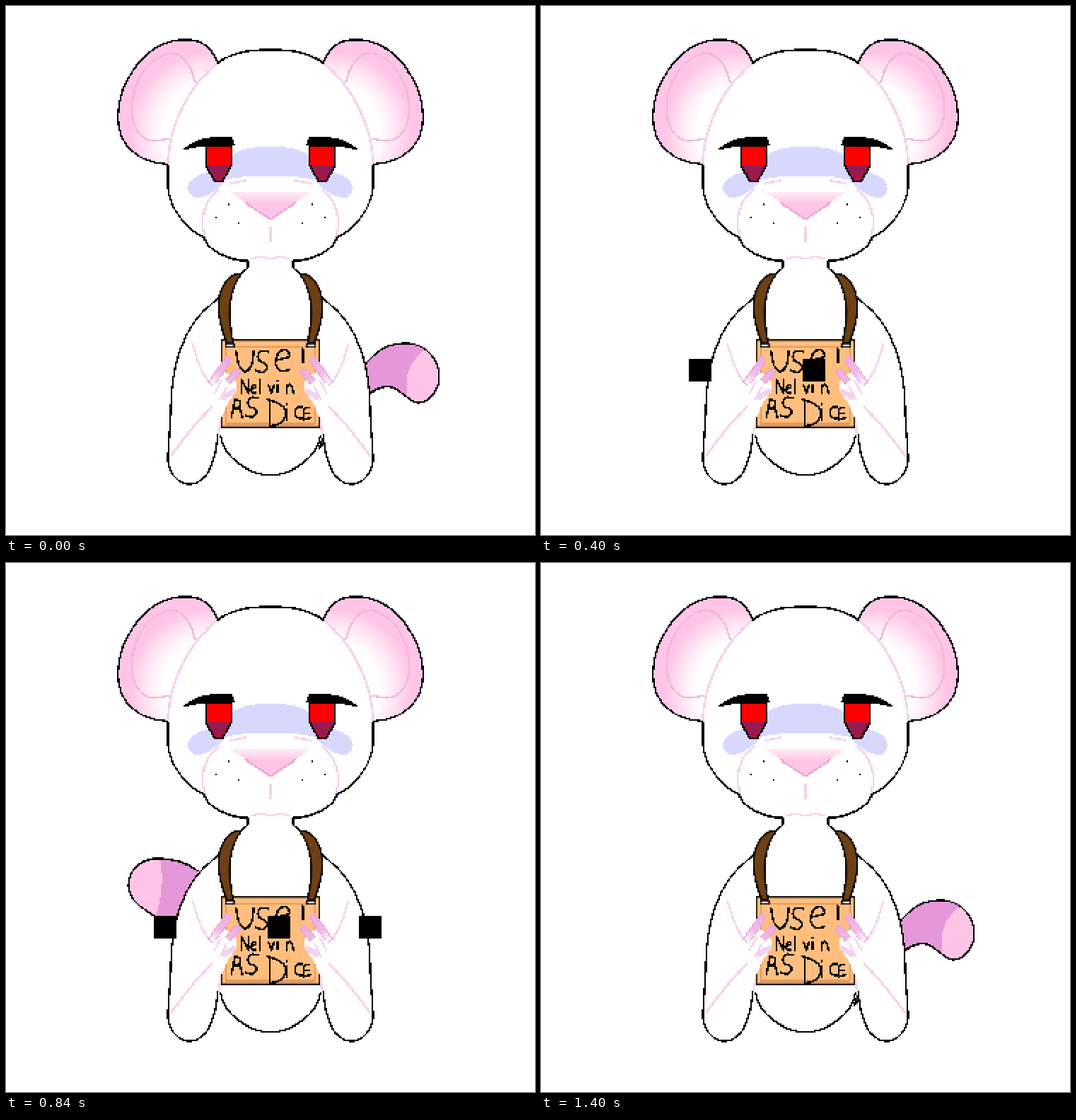
Write an HTML page with a canvas that moves like this. It is 748 px wide and 748 px high and loops after 1600 ms.

```html
<!DOCTYPE html>
<html lang="en">
<head>
<meta charset="utf-8">
<title>Mouse with a sign</title>
<style>
html, body { margin: 0; width: 100%; height: 100%; overflow: hidden; background: #fff; }
canvas { display: block; width: 748px; height: 748px; image-rendering: pixelated; }
</style>
</head>
<body>
<canvas id="view"></canvas>
<script>
const SIZE = 748, GRID = 372, K = GRID / SIZE;
const PINK = '#ffc5e6', PALE = '#f4d2ec', MAUVE = '#e697d9', BLACK = '#000', WHITE = '#fff';

function layer() {
  const c = document.createElement('canvas');
  c.width = c.height = GRID;
  return c.getContext('2d', { willReadFrequently: true });
}
const pen = layer();

// Paint a path with hard pixel edges; flip mirrors it about the middle
function paint(out, path, { fill, line, w = 2.3, flip, clip }) {
  const shape = new Path2D(path);
  pen.setTransform(1, 0, 0, 1, 0, 0);
  pen.clearRect(0, 0, GRID, GRID);
  pen.save();
  pen.setTransform(flip ? -K : K, 0, 0, K, flip ? GRID : 0, 0);
  pen.lineCap = pen.lineJoin = 'round';
  if (clip) pen.clip(new Path2D(clip));
  if (fill) { pen.fillStyle = fill; pen.fill(shape); }
  if (line) { pen.strokeStyle = line; pen.lineWidth = w; pen.stroke(shape); }
  pen.restore();
  const img = pen.getImageData(0, 0, GRID, GRID), d = img.data;
  for (let i = 3; i < d.length; i += 4) d[i] = d[i] > 110 ? 255 : 0;
  pen.putImageData(img, 0, 0);
  out.drawImage(pen.canvas, 0, 0);
}

function both(out, path, style) {
  paint(out, path, style);
  paint(out, path, { ...style, flip: true });
}

// Colours spread evenly along a gradient
function blend(gradient, ...colors) {
  colors.forEach((c, i) => gradient.addColorStop(i / (colors.length - 1), c));
  return gradient;
}

// Left halves of the symmetric outlines
const ARM = 'C245 455 233 515 233 580 L229 640 C229 660 245 676 260 676 C285 676 297 640 299 606';
const BELLY = 'C307 640 345 663 374 663';
const BROW = 'C350 62 320 64 299 81', TEMPLE = 'C260 110 230 170 229 224';
const CHEEK = 'V255 C230 285 258 318 280 326', CHIN = 'C282 345 315 360 342 360';
const EAR = 'M299 80 C285 50 270 47 250 48 C200 50 158 105 158 157 C158 200 190 222 229 224';

function drawBody(g) {
  both(g, `M374 360 H342 V370 L299 414 ${ARM} L303 608 ${BELLY} Z`, { fill: WHITE });
  both(g, `M299 414 ${ARM} M303 608 ${BELLY}`, { line: BLACK });
  both(g, 'M264 478 Q271 505 285 532', { line: PALE });
  both(g, 'M234 636 Q265 592 300 558 M304 582 L300 606', { line: PALE, w: 3 });
}

function drawHead(g) {
  const glow = blend(pen.createRadialGradient(285, 175, 64, 285, 175, 110), WHITE, '#fff0f8', '#ffdcf0', PINK);
  both(g, EAR, { fill: glow });
  both(g, 'M268 108 C258 70 240 62 222 70 C165 95 165 190 210 191 L230 188', { line: '#f0b8d8' });
  both(g, EAR, { line: BLACK });
  both(g, `M374 62 ${BROW} ${TEMPLE} ${CHEEK} ${CHIN} H374 Z`, { fill: WHITE });
  both(g, `M299 81 ${TEMPLE}`, { line: PALE, w: 3 });
  both(g, `M374 62 ${BROW} M229 224 ${CHEEK} ${CHIN} V370 L333 378`, { line: BLACK });
  both(g, 'M346 357 L360 355 L374 357', { line: PALE });
}

function drawFace(g) {
  both(g, 'M374 199 C345 199 330 203 318 212 L300 232 C265 238 255 250 259 263 ' +
    'C265 280 290 270 312 246 Q330 241 374 241 Z', { fill: '#d8d8ff' });
  both(g, 'M281 325 C275 300 278 278 300 260 M316 251 L340 247', { line: PALE });

  const eye = 'M283 197 V228 L295 248 H306 L318 226 V197 Z';
  both(g, eye, { fill: '#f00' });
  both(g, 'M280 226 H320 V250 H280 Z', { fill: blend(pen.createLinearGradient(0, 226, 0, 248), '#8e1f57', '#a81440'), clip: eye });
  both(g, eye, { line: BLACK });
  both(g, 'M249 204 Q268 188 288 186 H320 L323 197 H285 Z', { fill: BLACK });

  paint(g, 'M316 263 H432 L374 301 Z', { fill: blend(pen.createLinearGradient(0, 262, 0, 280), '#fff0f8', PINK) });
  both(g, 'M338 278 L374 301', { line: '#eaa9ce' });
  paint(g, 'M374 313 V334', { line: PALE });
  both(g, 'M314 279h2v2h-2z M296 298h2v2h-2z M328 305h2v2h-2z', { fill: BLACK });
}

// Handwriting strokes in a box ten units tall
const GLYPHS = {
  U: 'M0 0 Q1 9 4 9.6 Q8 9 8 0',
  S: 'M6 .5 Q1 -1 1 3 Q1 5 4 5.5 Q7 8 3 10 L0 9',
  A: 'M0 10 L2 1 Q6 2 4 5 L1 6 L4.5 5.5 L5.5 10',
  D: 'M1 0 V10 M0 0 Q8 2 7 6 Q6 10 1 10',
  C: 'M5 3 Q1 2 1 6 Q1 10 6 9',
  E: 'M5 3 L2 4 V10 L6 9 M2 6.5 H5',
  N: 'M0 10 V0 L5 10 V0',
  e: 'M0 7 L4 6 Q4 3.5 2 4 Q0 5 0 8 Q1 11 4 9.5',
  i: 'M0 4 V10 M0 1 V1.5',
  l: 'M0 0 V10',
  n: 'M0 10 V4 M0 6 Q2 2 4 5 L5 10',
  v: 'M0 4 L2 10 L4 4'
};

function write(g, word, x, y, size, step = 0) {
  const path = new Path2D();
  [...word].forEach((ch, i) =>
    path.addPath(new Path2D(GLYPHS[ch]), new DOMMatrix([size, 0, 0, size, x + i * step, y])));
  paint(g, path, { line: BLACK, w: 2.6 });
}

function drawSign(g) {
  paint(g, 'M304 472 H444 V596 H304 Z', { fill: '#ffbe7d', line: BLACK });
  paint(g, 'M310 481 H437 V591 H310 Z', { line: '#e59b5c' });
  both(g, 'M333 378 C310 378 300 405 300 425 C300 445 305 460 312 476 H321 C313 440 312 405 333 378 Z',
    { fill: '#6e4015', line: BLACK });
  both(g, 'M310 477 H322 V482 H310 Z', { fill: WHITE, line: BLACK });
  write(g, 'US', 325, 487, 3.1, 28);
  write(g, 'e', 381, 466, 5);
  write(g, 'l', 420, 484, 2);
  write(g, 'Nelvin', 333, 528, 1.9, 12.8);
  write(g, 'AS', 318, 553, 2.9, 21);
  write(g, 'D', 369, 556, 3.8);
  write(g, 'iCE', 397, 560, 2.5, 9.5);
}

function drawHands(g) {
  both(g, 'M286 532 L305 515 L324 526 L326 545 L314 560 L304 582 H298 L288 560 Z', { fill: WHITE });
  const finger = (x, y, dx, dy) => {
    const shade = blend(pen.createLinearGradient(x, y, x - 26, y + 34), '#eeaee0', '#f2bce6', WHITE);
    both(g, `M${x} ${y} l${dx} ${dy}`, { line: '#e9a4da', w: 11 });
    both(g, `M${x} ${y} l${dx} ${dy}`, { line: shade, w: 8 });
  };
  finger(313, 501, -21, 30);
  finger(326, 518, -19, 20);
  both(g, 'M292 536 L308 528 L318 536 L310 556 L296 564 Z', { fill: WHITE });
  both(g, 'M322 545 L308 553', { line: PALE, w: 8 });
  both(g, 'M294 548 L304 530 M302 556 L312 538', { line: PALE });
}

const LOW = {
  shape: 'M508 506 C530 480 548 476 565 476 C595 477 613 500 613 523 C613 545 598 561 583 561 ' +
    'C565 559 558 538 540 538 Q528 538 514 548',
  tip: 'M600 480 C570 500 560 525 570 560 L640 580 V480 Z'
};
const HIGH = {
  shape: 'M476 436 C495 420 520 418 537 418 C560 420 575 437 575 457 C572 490 530 495 511 521',
  tip: 'M533 410 Q520 450 538 505 H600 V410 Z'
};

// One entry per pose; front tails cover the body's outline
const TAILS = [LOW, { ...HIGH, front: true }, null, { ...HIGH, flip: true }];

function drawTail(g, { shape, tip, flip }) {
  paint(g, shape, { fill: MAUVE, flip });
  paint(g, tip, { fill: PINK, clip: shape, flip });
  paint(g, shape, { line: BLACK, flip });
}

const mouse = layer();
[drawBody, drawHead, drawFace, drawSign, drawHands].forEach(draw => draw(mouse));

const poses = TAILS.map((tail, pose) => {
  const g = layer();
  g.fillStyle = WHITE;
  g.fillRect(0, 0, GRID, GRID);
  if (tail && !tail.front) drawTail(g, tail);
  g.drawImage(mouse.canvas, 0, 0);
  if (tail && tail.front) drawTail(g, tail);
  if (tail === LOW) paint(g, 'M448 612 L443 626 L450 617 Z', { fill: MAUVE, line: BLACK });
  g.fillStyle = BLACK;
  [104, 184, 248].slice(0, pose).forEach(x => g.fillRect(x, 248, 16, 16));
  return g.canvas;
});

const view = document.getElementById('view');
view.width = view.height = GRID;
const stage = view.getContext('2d');

// Swing through the poses and back
function tick() {
  const step = Math.floor(performance.now() / 200) % 8;
  stage.drawImage(poses[Math.min(step, 7 - step)], 0, 0);
  requestAnimationFrame(tick);
}
tick();
</script>
</body>
</html>
```
